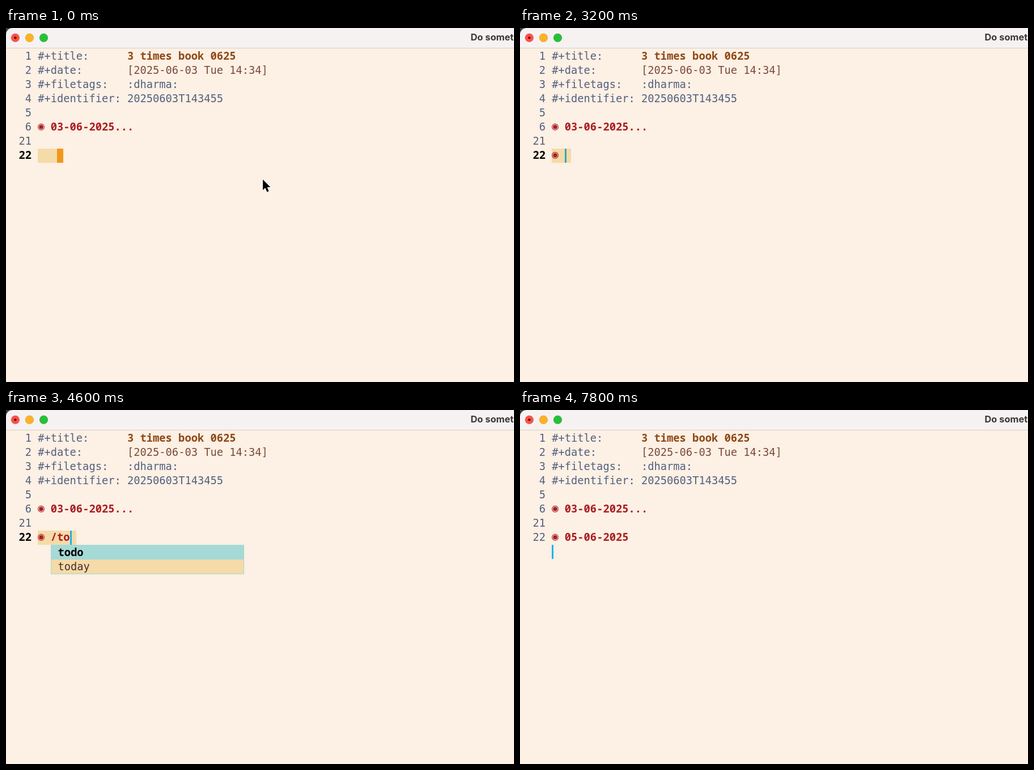
Write an HTML page that moves like this. It is 896 by 625 pixels and loops after 8000 ms.

```html
<!DOCTYPE html>
<html lang="en">
<head>
<meta charset="utf-8">
<title>Slash menu in a notes buffer</title>
<style>
  html, body { margin: 0; width: 100%; height: 100%; overflow: hidden; background: #fdf0e4; }
  svg { display: block; width: 896px; height: 625px; }
  text { font: 400 18.72px "DejaVu Sans Mono", monospace; white-space: pre; }
  .bold { font: 700 18.78px "Noto Sans Mono", monospace; }
  .title { font: 700 16.4px Inter, "Liberation Sans", sans-serif; fill: #3c3836; }
</style>
</head>
<body>
<svg viewBox="0 0 896 625">
  <rect width="896" height="625" fill="#fdf0e4"/>
  <rect width="896" height="36" fill="#f6f2f1"/>
  <rect y="35" width="896" height="1" fill="#d9d0c8"/>
  <path d="M0 0H11Q1 1 0 11Z" fill="#35404a"/>
  <g stroke="#000" stroke-opacity=".12" stroke-width=".8">
    <circle cx="16.4" cy="17.2" r="7.5" fill="#fe5149"/>
    <circle cx="41.4" cy="17.2" r="7.5" fill="#fdb125"/>
    <circle cx="66.5" cy="17.2" r="7.5" fill="#25c138"/>
  </g>
  <circle cx="16.4" cy="17.2" r="2.3" fill="#6a0d08"/>
  <text class="title" x="819.5" y="22.3">Do somet</text>
  <g id="buffer"></g>
  <g id="live"></g>
  <path id="pointer" d="M453 267.5V286.3L457.3 282.3L460.4 289.4L463.6 288L460.6 281.1H466.4Z"
        fill="#000" stroke="#fff" stroke-width="1.5" stroke-linejoin="round" paint-order="stroke"/>
</svg>
<script>
const LOOP = 8000, CELL = 11.268, LEFT = 56.3, ROW = 25, TOP = 38;
const SLATE = '#53607f', RED = '#ab1d22', SAND = '#f4dba8', TEAL = '#a5dad6', CARET = '#1ab2f2';

const colX = col => LEFT + col * CELL;
const edge = col => Math.round(colX(col));
const rowY = row => TOP + row * ROW;
const rect = (x, y, w, h, fill) =>
  `<rect x="${x}" y="${y}" width="${w}" height="${h}" fill="${fill}"/>`;
const text = (x, y, str, fill, bold) =>
  `<text x="${x}" y="${y}" fill="${fill}" class="${bold ? 'bold' : ''}">${str}</text>`;
const write = (row, col, str, fill, bold) => text(colX(col), rowY(row) + 18.3, str, fill, bold);
const cells = (row, from, to, fill) =>
  rect(edge(from), rowY(row), edge(to) - edge(from), ROW, fill);
const caret = (row, col, fill) => rect(edge(col), rowY(row), 3, ROW, fill);
const lineNumber = (row, n, current) =>
  write(row, -1 - String(n).length, n, current ? '#000' : SLATE, current);
const bullet = row => {
  const at = `cx="62" cy="${rowY(row) + 11.8}"`;
  return `<circle ${at} r="5.4" fill="none" stroke="${RED}" stroke-width="1.1"/>` +
         `<circle ${at} r="3.8" fill="${RED}"/>`;
};

const header = [
  ['#+title:', '3 times book 0625', '#8f4a17', true],
  ['#+date:', '[2025-06-03 Tue 14:34]', '#7c4a3b'],
  ['#+filetags:', ':dharma:', SLATE],
  ['#+identifier:', '20250603T143455', SLATE]
];
document.getElementById('buffer').innerHTML =
  header.map(([key, value, fill, bold], row) =>
    write(row, 0, key, SLATE) + write(row, 14, value, fill, bold)).join('') +
  [1, 2, 3, 4, 5, 6, 21].map((n, row) => lineNumber(row, n)).join('') +
  bullet(5) + write(5, 2, '03-06-2025...', RED, true);

function popup(items) {
  const y = rowY(8), h = items.length * ROW + 2;
  return rect(79, y, 341, h, TEAL) +
    (items.length > 1 ? rect(80, y + 26, 339, h - 27, SAND) : '') +
    items.map((item, i) =>
      text(91.4, y + 19.5 + i * ROW, item, i ? '#4a2e2e' : '#000', !i)).join('');
}

const all = ['now', 'done', 'todo', 'today', 'insert »', 'heading »', 'link »', 'table »', 'clock »'];
const pair = ['todo', 'today'];

// Each step holds until the next one starts.
const steps = [
  { at: 0, normal: true, pointer: true },
  { at: 1000, typed: '' },
  { at: 2200, typed: '*' },
  { at: 2400, head: true, typed: '' },
  { at: 3200, head: true, typed: '', caret: '#35a6c2' },
  { at: 3400, head: true, typed: '/', menu: all },
  { at: 3600, head: true, typed: '/n', menu: ['now', 'insert »', 'done', 'heading »'] },
  { at: 4000, head: true, typed: '/', menu: all },
  { at: 4400, head: true, typed: '/t', menu: [...pair, 'insert »', 'table »'] },
  { at: 4600, head: true, typed: '/to', menu: pair },
  { at: 5400, head: true, typed: '/tod', menu: pair },
  { at: 5600, head: true, typed: '/toda', menu: ['today'], caret: '#2ba9d2' },
  { at: 6000, head: true, typed: '05-06-2025' },
  { at: 6800, head: true, typed: '05-06-2025', newline: true }
];

function draw(step) {
  const row = 7, start = step.head ? 2 : 0;
  if (step.normal) {
    return lineNumber(row, 22, true) + cells(row, 0, 3, SAND) + cells(row, 3, 4, '#f0981c');
  }
  const end = start + step.typed.length;
  const line = (step.head ? bullet(row) : '') + write(row, start, step.typed, RED, true);
  const color = step.caret || CARET;
  if (step.newline) return lineNumber(row, 22) + line + caret(row + 1, 0, color);
  return lineNumber(row, 22, true) + cells(row, 0, end + 1, SAND) +
    line + caret(row, end, color) + (step.menu ? popup(step.menu) : '');
}

const live = document.getElementById('live');
const pointer = document.getElementById('pointer');
const begin = performance.now();
let shown;

function tick() {
  const time = (performance.now() - begin) % LOOP;
  const step = steps.findLast(s => s.at <= time);
  if (step !== shown) {
    shown = step;
    live.innerHTML = draw(step);
    pointer.style.display = step.pointer ? '' : 'none';
  }
  requestAnimationFrame(tick);
}
tick();
</script>
</body>
</html>
```
